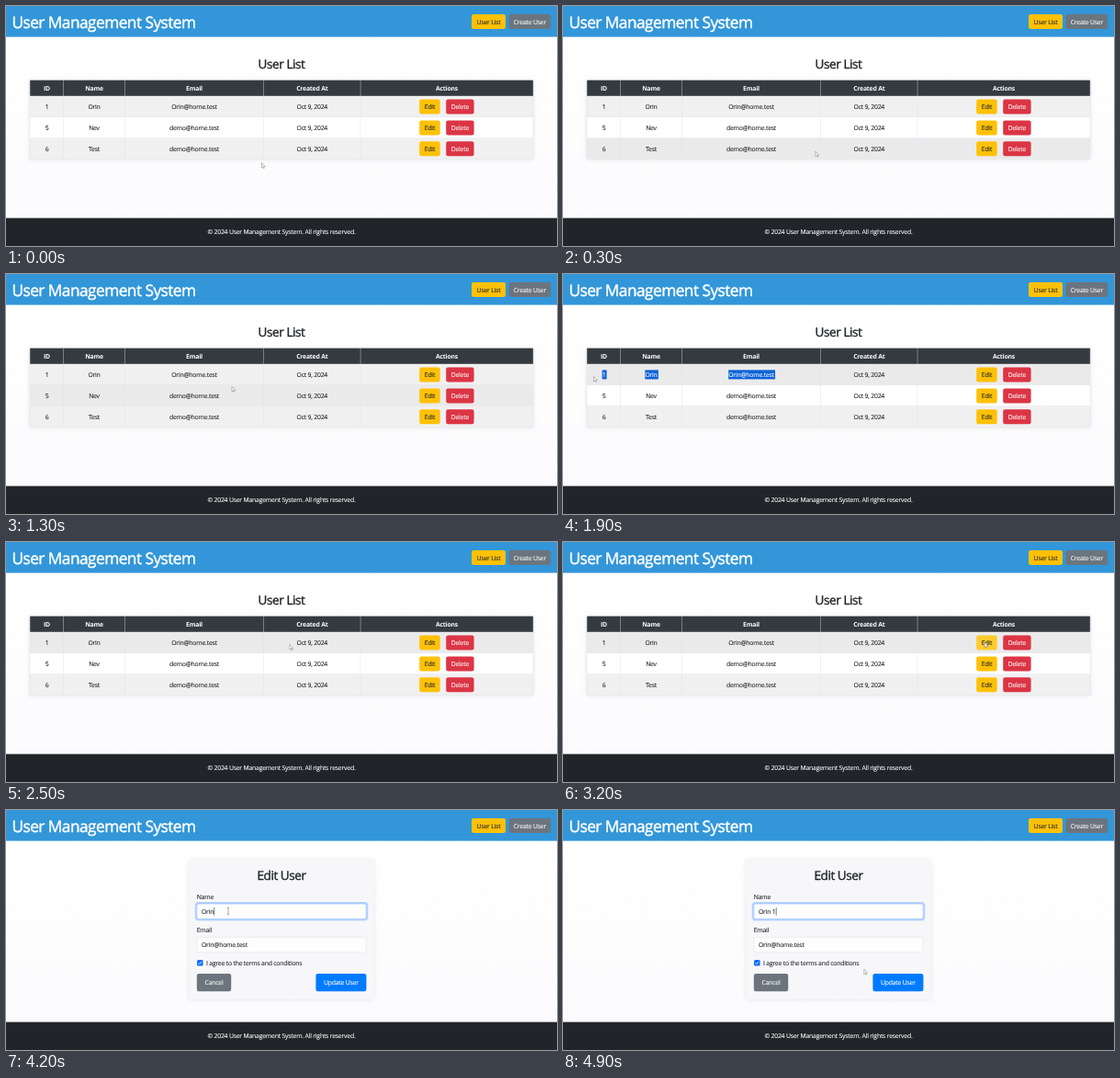
An HTML page for the animation above (5000 ms loop, 600 px wide and 261 px high).

```html
<!DOCTYPE html>
<html lang="en">
<head>
<meta charset="utf-8">
<title>User Management System</title>
<style>
  html, body { margin: 0; width: 100%; height: 100%; overflow: hidden; background: #fdfdfe; }
  svg { display: block; width: 100%; height: 100%; }
  text {
    --ink: #212529;
    font: 400 6.85px "Open Sans", "Noto Sans", sans-serif;
    letter-spacing: -.03em; fill: var(--ink); stroke: var(--ink); stroke-width: .1;
    text-rendering: geometricPrecision; white-space: pre;
  }
  .light, .th, .title { --ink: #fff; }
  .title { font-size: 17.25px; stroke-width: .45; }
  .heading { font-size: 13.5px; stroke-width: .4; }
  .th { font-weight: 700; stroke-width: 0; }
  .mid { text-anchor: middle; }
  .shadow { filter: drop-shadow(0 0 2.5px rgba(0, 0, 0, .1)); }
</style>
</head>
<body>
<svg id="stage" viewBox="0 0 600 261">
  <defs>
    <linearGradient id="page" x2="0" y2="1">
      <stop offset="0" stop-color="#fff"/><stop offset="1" stop-color="#fbfbfd"/>
    </linearGradient>
  </defs>
</svg>
<script>
const LOOP = 5000, STEP = 100;
const stage = document.getElementById('stage');

function add(parent, tag, attrs, content) {
  const el = document.createElementNS('http://www.w3.org/2000/svg', tag);
  for (const key in attrs) el.setAttribute(key, attrs[key]);
  if (content !== undefined) el.textContent = content;
  parent.append(el);
  return el;
}
const rect = (parent, x, y, width, height, fill, extra) =>
  add(parent, 'rect', { x, y, width, height, fill, ...extra });
const text = (parent, x, y, content, cls = '') =>
  add(parent, 'text', { x, y, class: cls }, content);
const show = (el, on) => el.setAttribute('visibility', on ? 'inherit' : 'hidden');

function button(parent, x, y, w, h, fill, label, cls = 'light') {
  const box = rect(parent, x, y, w, h, fill, { rx: 2.2 });
  text(parent, x + w / 2, y + h / 2 + 2.5, label, 'mid ' + cls);
  return box;
}

// Page frame
rect(stage, 0, 33, 600, 199, 'url(#page)');
rect(stage, 0, 0, 600, 33.6, '#3296d9');
text(stage, 6.4, 24, 'User Management System', 'title');
button(stage, 507, 9, 37, 16, '#ffc107', 'User List', '');
button(stage, 547.6, 9, 45.6, 16, '#6c757d', 'Create User');
rect(stage, 0, 230.6, 600, 30.4, '#212529');
text(stage, 300, 248.4, '© 2024 User Management System. All rights reserved.', 'mid light');

// List view
const EDGES = [26, 62.5, 129.5, 280.5, 386, 574];
const CENTERS = [44.5, 96, 205, 333.3, 480];
const ROW_TOP = 98, ROW_H = 22.9;
const USERS = [
  ['1', 'Orin', 'Orin@home.test'],
  ['5', 'Nev', 'demo@home.test'],
  ['6', 'Test', 'demo@home.test']
];

const list = add(stage, 'g');
text(list, 300, 67.6, 'User List', 'mid heading');
rect(list, 26, 81, 548, 86, '#fff', { class: 'shadow' });
rect(list, 26, 80.7, 548, 17.1, '#343a40');
['ID', 'Name', 'Email', 'Created At', 'Actions'].forEach((label, i) =>
  text(list, CENTERS[i], 92, label, 'mid th'));

let editButton;
const cells = [];
const rows = USERS.map((user, r) => {
  const y = ROW_TOP + r * ROW_H, base = y + 14;
  const bar = rect(list, 26, y, 548, ROW_H, '#fff');
  rect(list, 26, y + ROW_H - .5, 548, .5, '#dee2e6');
  [...user, 'Oct 9, 2024'].forEach((value, i) => {
    const selection = r === 0 && i < 3 ? rect(list, 0, base - 7.6, 0, 10, '#0b62d6') : null;
    const label = text(list, CENTERS[i], base, value, 'mid');
    if (selection) cells.push({ selection, label, x: CENTERS[i] });
  });
  const edit = button(list, 450.2, y + 3.5, 22.5, 16, '#ffc107', 'Edit', '');
  button(list, 479.2, y + 3.5, 30.4, 16, '#dc3545', 'Delete');
  editButton = editButton || edit;
  return bar;
});
EDGES.forEach(x => {
  rect(list, x - .25, 81, .6, 17, '#a9adb1');
  rect(list, x - .25, ROW_TOP, .5, 3 * ROW_H, '#dee2e6');
});

// Edit form
const form = add(stage, 'g');
rect(form, 199.5, 54, 201, 152, '#f7f7fa', { rx: 2.5, class: 'shadow' });
text(form, 300, 76, 'Edit User', 'mid heading');

function field(y, label, value) {
  text(form, 207.7, y - 5, label);
  const ring = rect(form, 206.7, y - 1, 186.6, 18.6, 'none',
    { rx: 3, stroke: '#0d6efd', 'stroke-width': 2 });
  const box = rect(form, 207.8, y, 184.4, 16.5, '#fdfdfe',
    { rx: 2.2, stroke: '#dee2e6', 'stroke-width': .6 });
  return { ring, box, label: text(form, 213, y + 10.9, value) };
}
const nameField = field(102, 'Name', USERS[0][1]);
show(field(138.3, 'Email', USERS[0][2]).ring, false);
const caret = rect(form, 0, 106, .6, 8.6, '#212529');

rect(form, 208, 163, 6.6, 6.6, '#0d6efd', { rx: 1.5 });
add(form, 'path', { d: 'M209.6 166.4l1.2 1.2 2.3-2.5', fill: 'none', stroke: '#fff', 'stroke-width': .9 });
text(form, 218, 169, 'I agree to the terms and conditions');
button(form, 207.8, 178, 37.4, 19.2, '#6c757d', 'Cancel');
button(form, 337.4, 178, 55, 19.2, '#007bff', 'Update User');

// Pointer
const arrow = add(stage, 'path', {
  d: 'M0 0V5.5L1.2 4.4 2 6.2 2.8 5.8 2 4.1H3.7Z',
  fill: '#fff', stroke: '#777', 'stroke-width': .5
});
const beam = add(stage, 'path', {
  d: 'M-1.2-3.5H1.2M0-3.5V3.5M-1.2 3.5H1.2', fill: 'none', stroke: '#777', 'stroke-width': .6
});

// time, x, y of the pointer tip
const PATH = [
  [0, 278.5, 170.5], [100, 278.5, 170.5], [300, 275, 158], [600, 261.5, 129], [700, 260, 127.5],
  [900, 257, 126], [1000, 257, 126], [1300, 246, 122.3], [1400, 239, 116], [1600, 232, 112],
  [1700, 170, 112], [1800, 80, 111], [1900, 33.5, 111.5], [2000, 33.5, 111.5],
  [2200, 110, 123], [2300, 185, 125], [2500, 309, 111.5], [2700, 365, 110],
  [3000, 446, 109], [3200, 459, 109], [3400, 458, 108], [3500, 429.3, 102.3],
  [3700, 345, 106], [3900, 256, 110], [4100, 242, 110], [4800, 242, 110],
  [4900, 327.8, 173], [5000, 327.8, 173]
];

function pointerAt(t) {
  const i = PATH.findIndex(p => p[0] > t);
  const [t0, x0, y0] = PATH[i - 1], [t1, x1, y1] = PATH[i];
  const k = (t - t0) / (t1 - t0);
  return [x0 + (x1 - x0) * k, y0 + (y1 - y0) * k];
}

function draw(t) {
  const [x, y] = pointerAt(t);
  const editing = t >= 3400, focused = t >= 4000;
  show(list, !editing);
  show(form, editing);

  const hovered = Math.floor((y - ROW_TOP) / ROW_H);
  rows.forEach((row, i) =>
    row.setAttribute('fill', i === hovered ? '#ebeaeb' : i % 2 ? '#fff' : '#f1f0f1'));
  editButton.setAttribute('fill', x > 450 && !editing ? '#ffca2c' : '#ffc107');

  cells.forEach(cell => {
    const on = t >= 1700 && t < 2100 && x < cell.x;
    const width = cell.label.getComputedTextLength();
    cell.selection.setAttribute('x', cell.x - width / 2);
    cell.selection.setAttribute('width', on ? width + 1.2 : 0);
    cell.label.classList.toggle('light', on);
  });

  const typed = t >= 4700 ? ' 1' : t >= 4400 ? ' ' : '';
  nameField.label.textContent = USERS[0][1] + typed;
  nameField.box.setAttribute('stroke', focused ? '#86b7fe' : '#dee2e6');
  nameField.ring.setAttribute('opacity', focused ? Math.min(.27, .12 + (t - 4000) / 600) : 0);
  caret.setAttribute('x', 213.3 + nameField.label.getComputedTextLength());
  show(caret, focused);

  const inField = editing && t < 4900 && x > 208 && x < 392;
  const typing = t >= 4400 && t < 4900;
  for (const shape of [arrow, beam]) shape.setAttribute('transform', `translate(${x} ${y})`);
  show(arrow, !inField && !typing);
  show(beam, inField && !typing);
}

const start = performance.now();
function tick() {
  const t = (performance.now() - start) % LOOP;
  draw(Math.floor(t / STEP) * STEP);
  requestAnimationFrame(tick);
}
tick();
</script>
</body>
</html>
```
